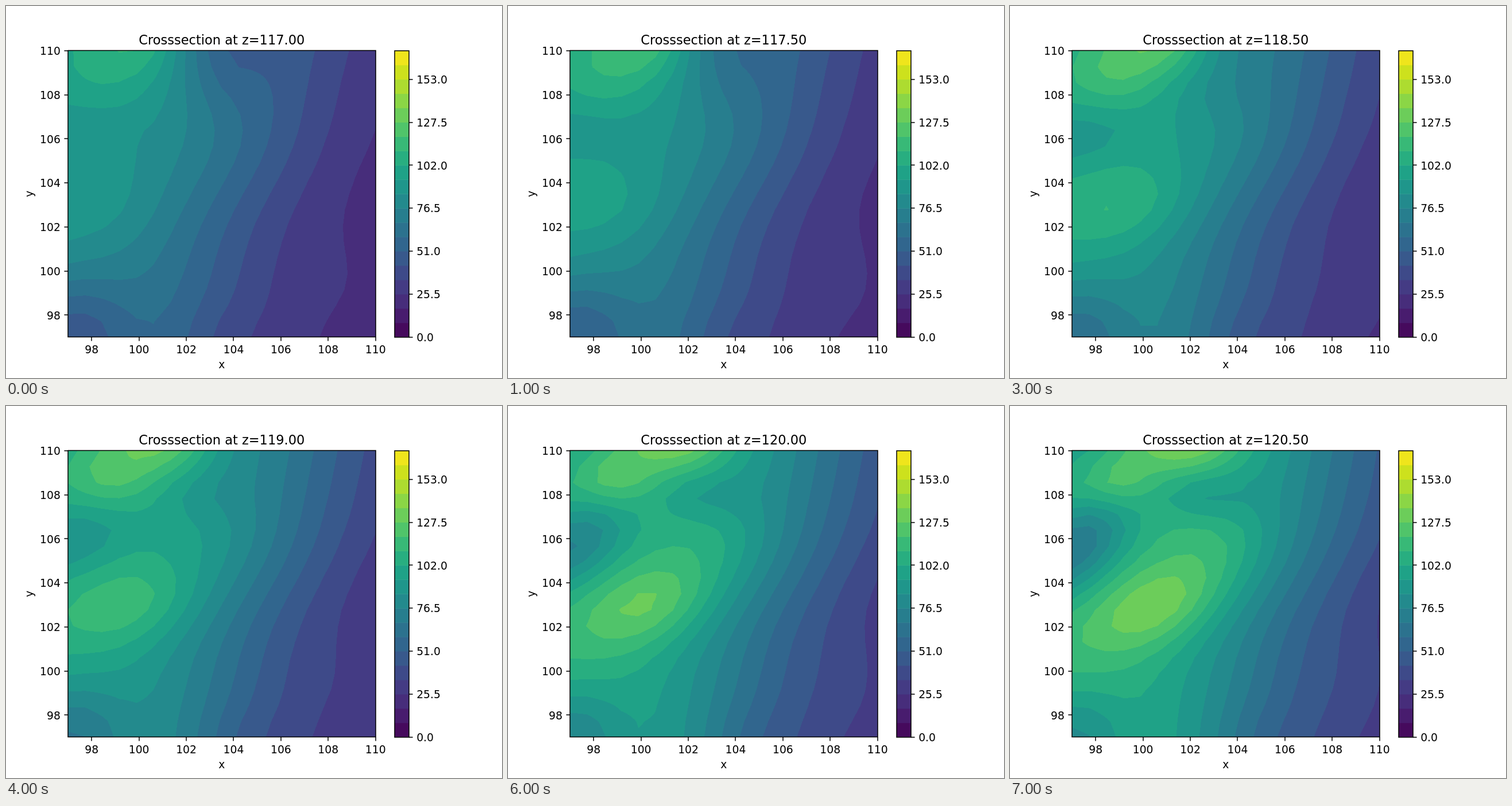
Write an HTML page with a canvas that moves like this. It is 864x648 px and loops after 8 s.

```html
<!DOCTYPE html>
<html lang="en">
<head>
<meta charset="utf-8">
<title>Cross-section contours</title>
<style>
html, body { margin: 0; width: 100%; height: 100%; overflow: hidden; background: #fff; }
canvas { position: absolute; left: 108px; top: 78px; }
svg { position: absolute; left: 0; top: 0; width: 864px; height: 648px; font: 18.75px "DejaVu Sans", sans-serif; }
#title { font-size: 22.5px; text-anchor: middle; }
.line { fill: none; stroke: #000; stroke-width: 1.5; }
</style>
</head>
<body>
<canvas id="plot" width="536" height="499"></canvas>
<svg id="frame" viewBox="0 0 864 648"></svg>
<script>
const LEFT = 108, TOP = 77.76, WIDTH = 535.68, HEIGHT = 498.96, BOTTOM = TOP + HEIGHT;
const FIRST = 97, SPAN = 13, CELLS = 18, SLICES = 8;
const colors = ('#460a5d #481c6e #472d7b #443b84 #3e4a89 #38598c #31668e #2c728e #277e8e #238a8d ' +
  '#1f968b #1fa287 #28ae80 #38b977 #50c46a #6ccd5a #8bd646 #addc30 #cde11d #efe51c').split(' ');

// Gaussian bump; lean tilts its long axis.
function bump(x, y, cx, cy, sx, sy, lean = 0) {
  const dx = x - cx, dy = y - cy - lean * dx;
  return Math.exp(-((dx / sx) ** 2 + (dy / sy) ** 2) / 2);
}

// Field in colour bands at depth t = z - 117.
function field(x, y, t) {
  const t2 = t * t;
  const front = 104.4 + 0.62 * t + 2 * Math.tanh((y - 104.2) / 3.3);
  const slope = 1.75 + (9.3 + 0.8 * t) / (1 + Math.exp((x - front) / 2.6));

  const island = (0.6 + 0.85 * t) * bump(x, y, 98.2 + 0.72 * t, 103, 2, 1.3, 0.1 * t);
  const peak = (1.8 + 0.7 * t - 0.13 * t2) * bump(x, y, 98.8, 109.6 - 0.27 * t, 1.8 - 0.17 * t, 1.6 - 0.2 * t);
  const crest = (1.5 + 1.2 * t - 0.17 * t2) * bump(x, y, 100.2 + 0.5 * t, 110.4, 1.1 + 0.15 * t, 0.9);
  const shoulder = 0.08 * t2 * bump(x, y, 103.3, 106, 1.5, 1.3);
  const shelf = (0.5 + 0.1 * t) * bump(x, y, 109.5, 99.5, 1.7, 2.2);

  const notch = (0.7 + 0.1 * t + 0.38 * t2) * bump(x, y, 97, 106.5 - 0.27 * t, 1.8, 0.7 + 0.23 * t, 0.15 * t);
  const foot = (4.7 - 0.35 * t) * bump(x, y, 97, 97, 2 - 0.14 * t, 2 - 0.14 * t);
  const corner = 0.2 * t2 * bump(x, y, 97, 110, 1.6, 1.2);
  const gap = 2.6 * Math.exp(-0.6 * t) * bump(x, y, 103.6, 110.4, 1.4, 2);
  const saddle = 0.15 * t2 * bump(x, y, 102.5, 107.9, 1.4, 0.8);
  const basin = 0.45 * bump(x, y, 107.5, 108, 2.2, 2.5) + 0.8 * bump(x, y, 103.3 + 0.4 * t, 96.7, 1.5, 1.3);

  return slope + island + peak + crest + shoulder + shelf - notch - foot - corner - gap - saddle - basin;
}

const canvas = document.getElementById('plot');
const ctx = canvas.getContext('2d');
const rgb = colors.map(c => [1, 3, 5].map(i => parseInt(c.slice(i, i + 2), 16)));

// Sample a coarse mesh, then fill hard-edged bands between its nodes.
function paint(t) {
  const { width, height } = canvas, img = ctx.createImageData(width, height);
  const unit = SPAN / CELLS, mesh = [];
  for (let j = 0; j <= CELLS; j++) {
    mesh.push(Array.from({ length: CELLS + 1 }, (_, i) => field(FIRST + i * unit, FIRST + SPAN - j * unit, t)));
  }
  for (let py = 0, o = 0; py < height; py++) {
    const v = (py + 0.5) / height * CELLS, j = Math.floor(v), fv = v - j;
    const row = mesh[j].map((a, i) => a + (mesh[j + 1][i] - a) * fv);
    for (let px = 0; px < width; px++, o += 4) {
      const u = (px + 0.5) / width * CELLS, i = Math.floor(u);
      const band = Math.floor(row[i] + (row[i + 1] - row[i]) * (u - i));
      img.data.set(rgb[Math.max(0, Math.min(19, band))], o);
      img.data[o + 3] = 255;
    }
  }
  ctx.putImageData(img, 0, 0);
}

const label = (x, y, s, anchor) => `<text x="${x}" y="${y}" text-anchor="${anchor}">${s}</text>`;
const rect = (x, y, w, h, attr) => `<rect x="${x}" y="${y}" width="${w}" height="${h}" ${attr}/>`;

function drawFrame() {
  const step = HEIGHT / colors.length;
  let out = '', ticks = '';
  colors.forEach((c, k) => {
    out += rect(677, BOTTOM - (k + 1) * step, 25, k ? step + 0.5 : step, `fill="${c}"`);
  });
  for (let k = 0; k < colors.length; k += 3) {
    const y = BOTTOM - k * step;
    ticks += `M702,${Math.round(y)}h6.6`;
    out += label(715.2, Math.round(y + 7.3), (k * 8.5).toFixed(1), 'start');
  }
  for (let v = 98; v <= 110; v += 2) {
    const f = (v - FIRST) / SPAN, x = LEFT + f * WIDTH, y = BOTTOM - f * HEIGHT;
    ticks += `M${Math.round(x)},577v6.6M${LEFT},${Math.round(y)}h-6.6`;
    out += label(x, 605, v, 'middle') + label(94.9, Math.round(y + 7.3), v, 'end');
  }
  out += '<text id="title" x="375.8" y="67"></text>' + label(375.8, 631, 'x', 'middle') +
    '<text transform="translate(47 327.3) rotate(-90)" text-anchor="middle">y</text>' +
    `<path class="line" d="${ticks}"/>` +
    rect(LEFT, 77.5, 536, 499, 'class="line"') + rect(677, 78, 25, 499, 'class="line"');
  document.getElementById('frame').innerHTML = out;
}

drawFrame();
const title = document.getElementById('title');
const start = performance.now();
let shown = -1;

function tick() {
  const n = Math.floor((performance.now() - start) / 1000) % SLICES;
  if (n !== shown) {
    shown = n;
    paint(n / 2);
    title.textContent = `Crosssection at z=${(117 + n / 2).toFixed(2)}`;
  }
  requestAnimationFrame(tick);
}
tick();
</script>
</body>
</html>
```
